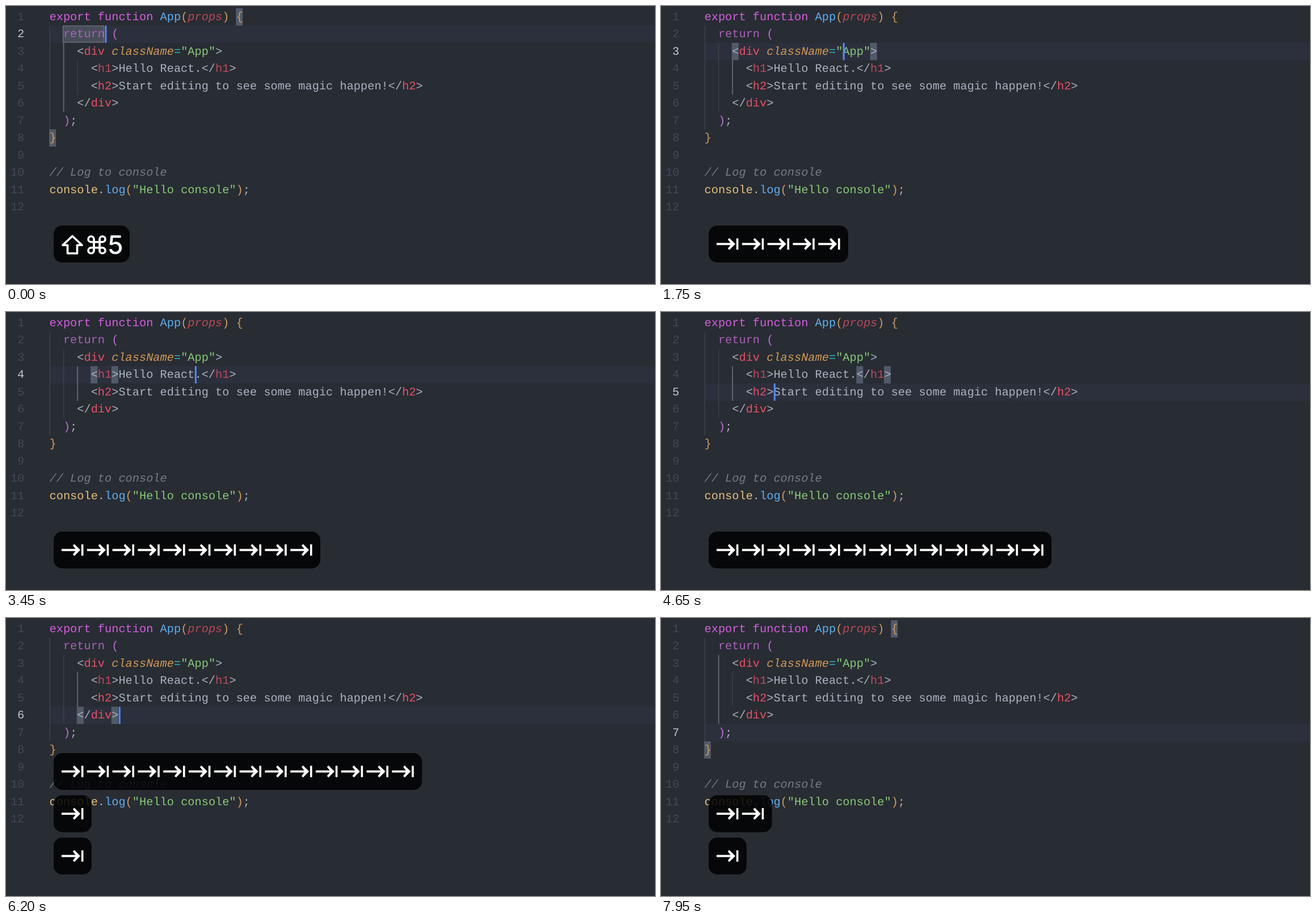
Recreate the animation shown at these times as an HTML page. Size 1144 by 490 pixels, loop 8 s.

```html
<!DOCTYPE html>
<html lang="en">
<head>
<meta charset="utf-8">
<title>Tabbing through code</title>
<style>
  html, body { margin: 0; width: 100%; height: 100%; overflow: hidden; background: #282c33; }
  svg { display: block; width: 1144px; height: 490px; }
  text { font: 20.32px "Liberation Mono", monospace; white-space: pre; text-rendering: geometricPrecision; fill: #abb2bf; }
  #nums text { fill: #434955; text-anchor: end; }
  #nums text.on { fill: #c3c8d1; }
  .key { fill: #d55fde; }
  .ret { fill: #a962b8; }
  .fn { fill: #5db0f2; }
  .arg { fill: #b9495a; font-style: italic; }
  .b1 { fill: #d19a5c; }
  .b2 { fill: #bf6fd6; }
  .tag { fill: #ec5068; }
  .dim { fill: #bd4a5c; }
  .attr { fill: #d19a56; font-style: italic; }
  .op { fill: #2bbac5; }
  .str { fill: #89ca78; }
  .rem { fill: #767c87; font-style: italic; }
  .obj { fill: #e5c07b; }
  #guides rect { fill: #3b4048; }
  #guides rect.on { fill: #70757d; }
  #marks rect { fill: #515a69; }
  #word { fill: #484e5a; stroke: #7b8089; }
  .digit { font: 500 45px Inter, "Liberation Sans", sans-serif; fill: #fff; }
</style>
</head>
<body>
<svg viewBox="0 0 1144 490">
  <defs>
    <g id="tab" fill="#fff">
      <path d="M14 30.6H40V34.4H14Z"/>
      <path d="M36.5 22L47 32.5L36.5 43L33.8 40.6L38.5 34.4V30.6L33.8 24.4Z"/>
      <path d="M48.8 22.5H52.4V42.5H48.8Z"/>
    </g>
    <g id="combo">
      <g fill="none" stroke="#fff" stroke-width="3.7" stroke-linejoin="round">
        <path d="M33 18.5L50 34.5H41.5V49H24.5V34.5H16Z"/>
        <path d="M71 29h10v10h-10z
          M71 29V24A5 5 0 1 0 66 29H71
          M81 29H86A5 5 0 1 0 81 24V29
          M81 39V44A5 5 0 1 0 86 39H81
          M71 39H66A5 5 0 1 0 71 44V39"/>
      </g>
      <text class="digit" x="95.5" y="50">5</text>
    </g>
  </defs>
  <rect width="1144" height="490" fill="#282c33"/>
  <rect id="row" x="77" width="1067" height="30.48" fill="#2c303c"/>
  <g id="guides"></g>
  <g id="marks"></g>
  <rect id="word" x="100.5" y="35" width="72" height="29"/>
  <g id="nums"></g>
  <g id="code">
    <text><tspan class="key">export function</tspan> <tspan class="fn">App</tspan><tspan class="b1">(</tspan><tspan class="arg">props</tspan><tspan class="b1">) {</tspan></text>
    <text>  <tspan class="ret">return</tspan> <tspan class="b2">(</tspan></text>
    <text>    &lt;<tspan class="tag">div</tspan> <tspan class="attr">className</tspan><tspan class="op">=</tspan><tspan class="str">"App"</tspan>&gt;</text>
    <text>      &lt;<tspan class="dim">h1</tspan>&gt;Hello React.&lt;/<tspan class="dim">h1</tspan>&gt;</text>
    <text>      &lt;<tspan class="tag">h2</tspan>&gt;Start editing to see some magic happen!&lt;/<tspan class="tag">h2</tspan>&gt;</text>
    <text>    &lt;/<tspan class="tag">div</tspan>&gt;</text>
    <text>  <tspan class="b2">)</tspan>;</text>
    <text><tspan class="b1">}</tspan></text>
    <text></text>
    <text><tspan class="rem">// Log to console</tspan></text>
    <text><tspan class="obj">console</tspan>.<tspan class="fn">log</tspan><tspan class="b1">(</tspan><tspan class="str">"Hello console"</tspan><tspan class="b1">)</tspan>;</text>
    <text></text>
  </g>
  <rect id="caret" width="3" height="30.48" fill="#528bff"/>
  <g id="keys"></g>
</svg>
<script>
const LOOP = 8000, CHAR = 12.194, LINE = 30.48, LEFT = 76.5, TOP = 4;
const $ = id => document.getElementById(id);
const colX = c => LEFT + c * CHAR;
const lineY = n => TOP + (n - 1) * LINE;

function place(el, attrs) {
  for (const k in attrs) el.setAttribute(k, attrs[k]);
}
function add(parent, name, attrs) {
  const el = document.createElementNS('http://www.w3.org/2000/svg', name);
  place(el, attrs);
  return parent.appendChild(el);
}

// Bracket pairs as [line, column] ends
const pairs = {
  body: [[1, 27], [8, 0]],
  paren: [[2, 9], [7, 2]],
  div: [[3, 4], [3, 24]],
  h1: [[4, 6], [4, 9]],
  h1End: [[4, 22], [4, 26]],
  h2: [[5, 6], [5, 9]],
  h2End: [[5, 49], [5, 53]],
  divEnd: [[6, 4], [6, 9]]
};

// Caret stops: time, line, column, bracket pair, caret delay
const stops = [
  [-400, 2, 8, 'body'],
  [50, 2, 9, 'paren'], [400, 2, 10, 'paren'],
  [750, 3, 18, 'div'], [1200, 3, 19, 'div'], [1700, 3, 20, 'div'],
  [2050, 3, 23, 'div'], [2450, 3, 24, 'div'], [2750, 3, 25, 'div'],
  [3100, 4, 10, 'h1'], [3450, 4, 21, 'paren'], [3700, 4, 22, 'h1End'], [4200, 4, 27, 'h1End'],
  [4650, 5, 10, 'h2'], [5000, 5, 49, 'h2End'], [5500, 5, 54, 'h2End', 50],
  [6050, 6, 10, 'divEnd'], [6550, 7, 3, 'paren', 50], [7450, 7, 4, 'body']
].map(([at, line, col, pair, lag = 0]) => ({ at, line, col, pair, moved: at + lag }));

const tabs = stops.slice(1).map(s => s.at);
const groups = [
  { combo: true, times: [-1600] },
  { times: tabs.slice(0, 14) },
  { times: tabs.slice(14, 15) },
  { times: tabs.slice(15, 17) },
  { times: tabs.slice(17) }
];

// Static parts
[...$('code').children].forEach((el, i) => {
  const y = lineY(i + 1) + 20.7;
  place(el, { x: LEFT, y });
  add($('nums'), 'text', { x: 32.3, y }).textContent = i + 1;
});
const nums = [...$('nums').children];
const guides = [[0, 2, 6], [2, 3, 4], [4, 4, 2]].map(([col, line, count]) =>
  add($('guides'), 'rect', { x: colX(col), y: lineY(line), width: 1.5, height: count * LINE }));
const marks = [0, 1].map(() => add($('marks'), 'rect', { width: 12, height: LINE }));

for (const g of groups) {
  g.el = add($('keys'), 'g', {});
  g.box = add(g.el, 'rect', { height: 65, rx: 15, fill: '#000', 'fill-opacity': 0.85 });
  g.signs = g.times.map((_, i) =>
    add(g.el, 'use', { href: g.combo ? '#combo' : '#tab', x: i * 44.8 }));
}

const latest = (t, key) => stops.filter(s => s[key] <= t).pop();

function drawKeys(t) {
  const shown = groups.filter(g => g.times[0] <= t);
  for (const g of groups) {
    const slot = shown.length - 1 - shown.indexOf(g);
    const pressed = g.times.filter(at => at <= t);
    const count = pressed.length;
    const fade = count ? 1 - (t - pressed[count - 1] - 1950) / 200 : 0;
    place(g.el, {
      transform: `translate(84 ${387 - slot * 74.5})`,
      opacity: Math.max(0, Math.min(1, fade))
    });
    g.box.setAttribute('width', g.combo ? 134 : 22 + 44.8 * count);
    g.signs.forEach((s, i) => s.setAttribute('visibility', i < count ? 'inherit' : 'hidden'));
  }
}

function draw(t) {
  const s = latest(t, 'moved');
  const { pair } = latest(t - 50, 'at');
  $('row').setAttribute('y', lineY(s.line));
  nums.forEach((n, i) => n.classList.toggle('on', i + 1 === s.line));
  const active = s.line === 2 || s.line === 7 ? 1 : 2;
  guides.forEach((g, i) => g.classList.toggle('on', i === active));
  pairs[pair].forEach(([line, col], i) => place(marks[i], { x: colX(col) - 0.5, y: lineY(line) }));
  $('word').setAttribute('visibility', s === stops[0] ? 'visible' : 'hidden');
  place($('caret'), {
    x: colX(s.col) + 0.3,
    y: lineY(s.line),
    visibility: (t - s.moved) % 1000 < 500 ? 'visible' : 'hidden'
  });
  drawKeys(t);
}

const start = performance.now();
function tick(now) {
  draw(Math.max(0, now - start) % LOOP);
  requestAnimationFrame(tick);
}
draw(0);
requestAnimationFrame(tick);
</script>
</body>
</html>
```
